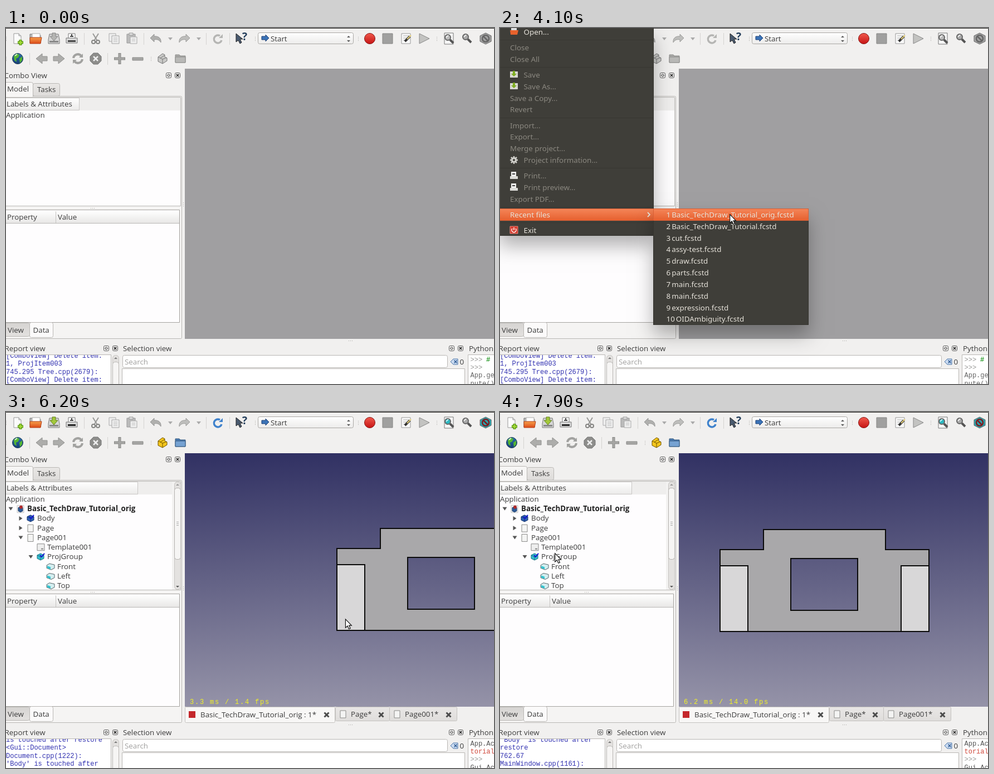
An HTML page with a canvas that plays this animation: 876 px wide and 639 px high, repeating every 8 s.

```html
<!DOCTYPE html>
<html lang="en">
<head>
<meta charset="utf-8">
<title>Opening a recent file</title>
<style>
html, body { margin: 0; width: 100%; height: 100%; overflow: hidden; background: #f1f0ef; }
canvas { display: block; }
</style>
</head>
<body>
<canvas id="stage" width="876" height="639"></canvas>
<script>
const c = document.getElementById('stage').getContext('2d');
const LOOP = 8000, STEP = 100;
const UI = '13.33px "Open Sans", sans-serif', BOLD = 'bold ' + UI;
const MENU_FONT = '13.4px "Noto Sans", sans-serif';
const MONO = '12px "Liberation Mono", monospace';
const INK = '#3b3b3b', EDGE = '#b9b7b4', BLUE = '#3030b0', RED = '#d0483b', GRAY = '#989896';

// ---- drawing helpers ----
function box(x, y, w, h, fill, stroke, r = 0) {
  c.beginPath();
  c.roundRect(x + .5, y + .5, w - 1, h - 1, r);
  if (fill) { c.fillStyle = fill; r || stroke ? c.fill() : c.fillRect(x, y, w, h); }
  if (stroke) { c.strokeStyle = stroke; c.lineWidth = 1; c.stroke(); }
}
function shade(y0, y1, from, to) {
  const g = c.createLinearGradient(0, y0, 0, y1);
  g.addColorStop(0, from);
  g.addColorStop(1, to);
  return g;
}
function text(s, x, y, color = INK, font = UI) {
  c.font = font;
  c.fillStyle = color;
  c.fillText(s, x, Math.round(y + 4.5));
}
// Each part is [path, fill, stroke, line width], relative to (x, y).
function icon(x, y, ...parts) {
  c.save();
  c.translate(x, y);
  for (const [d, fill, stroke, width = 1] of parts) {
    const path = new Path2D(d);
    if (fill) { c.fillStyle = fill; c.fill(path, 'evenodd'); }
    if (stroke) { c.strokeStyle = stroke; c.lineWidth = width; c.stroke(path); }
  }
  c.restore();
}
const disc = (r, x = 0, y = 0) => `M${x - r} ${y}a${r} ${r} 0 1 0 ${2 * r} 0a${r} ${r} 0 1 0 ${-2 * r} 0Z`;
const rect = (x, y, w, h) => `M${x} ${y}h${w}v${h}h${-w}Z`;
function clipped(x, y, w, h, draw) {
  c.save();
  c.beginPath();
  c.rect(x, y, w, h);
  c.clip();
  draw();
  c.restore();
}
function dots(x, y, dx, dy) {
  for (let i = -1; i <= 1; i++) box(x + i * dx, y + i * dy, 1, 1, '#a5a3a0');
}
function cross(x, y, r, color, width) {
  icon(x, y, [`M${-r} ${-r}L${r} ${r}M${r} ${-r}L${-r} ${r}`, null, color, width]);
}
function dockButtons(x, y) {
  box(x - 5, y - 5, 10, 10, '#f8f7f6', '#555', 2);
  icon(x, y, [disc(2), null, '#444', 1.2]);
  box(x + 11, y - 5, 10, 10, '#f8f7f6', '#555', 2);
  cross(x + 16, y, 2.4, '#333', 1.6);
}

// ---- toolbars ----
const PAGE = 'M-6-9H3L7-5V9H-6Z';
const TURN = 'M-10-1L-3-8V-4C5-5 10 0 9 7C6 2 2 1-3 2V6Z';
const ARROW = 'M-10 0L1-9V-4H10V4H1V9Z';
const CYCLE = 'M7 2A7 7 0 1 1 4-6';
const FOLDER = 'M-9-7H-2L0-5H9V7H-9Z';
const flip = (x, y, d, ...style) => {
  c.save();
  c.translate(x, y);
  c.scale(-1, 1);
  icon(0, 0, [d, ...style]);
  c.restore();
};
function cycle(x, y, color) {
  icon(x, y, [CYCLE, null, color, 3.5], ['M2-2H9V-9Z', color]);
}
function lens(x, y, color, page) {
  if (page) icon(x, y, [rect(-8, -10, 16, 20), '#f6f6f6', '#777']);
  icon(x, y, ['M2 2L8 8', null, '#555', 4], [disc(5, -2, -2), color, '#666', 2], ['M-5-2L-1-6', null, '#fff', 1.5]);
}
function toolbars(doc, zoomReady) {
  const live = (on, off) => doc ? on : off;
  for (const x of [140, 247, 359, 401]) box(x, 9, 1, 21, '#d5d3d1');
  for (const x of [42, 182]) box(x, 45, 1, 21, '#d5d3d1');
  for (const [x, y] of [[447, 19], [632, 19], [773, 19], [260, 55], [0, 19], [0, 55]]) dots(x, y, 0, 3);

  icon(20, 19, [PAGE, '#fbfbfb', '#999'], ['M3-9V-5H7', '#ddd', '#999']);
  icon(26, 26, ['M-5 0H5M0-5V5', null, '#5d9a17', 5], ['M-4 0H4M0-4V4', null, '#a5dd38', 2]);
  icon(53, 19, ['M-10-8H-4L-2-6H9V8H-10Z', '#bbb', '#777'], [rect(-6, -9, 14, 8), '#fff', '#aaa'],
    ['M-10-2H11L9 9H-10Z', shade(-2, 9, '#f6a04b', '#dc4a18'), '#b23c16']);
  icon(86, 19, ['M-10 2L-8-8H8L10 2V9H-10Z', '#d6d6d6', '#777'], [rect(-8, 4, 16, 3), '#888'],
    ['M-3-10H3V-4H7L0 4-7-4H-3Z', live('#a3c93a', '#b5b5b3'), live('#5f7f1a', '#858585')]);
  icon(118, 19, [rect(-6, -9, 12, 9), '#fff', '#777'], ['M-3-4H3M0-8V-3', null, '#444', 2],
    [rect(-10, -1, 20, 9), '#d9d9d9', '#777'], [rect(-7, 3, 14, 3), live('#222', '#444')]);
  icon(161, 19, ['M-5-9L3 4M5-9L-3 4', null, '#9a9a98', 2], [disc(3, -4, 6) + disc(3, 4, 6), null, '#858583', 2]);
  icon(194, 19, [rect(-9, -9, 12, 14), '#eee', '#aaa'], [rect(-4, -5, 13, 14), '#eee', '#a5a5a5'],
    ['M-1-1H6M-1 2H6M-1 5H6', null, '#bbb']);
  icon(226, 19, [rect(-9, -8, 15, 16), '#bbb', '#999'], [rect(-5, -10, 7, 4), '#ddd', '#999'],
    [rect(-3, -3, 12, 12), '#eee', '#aaa'], ['M0 1H6M0 4H6', null, '#bbb']);
  icon(269, 19, [TURN, '#b0b0ae', '#999']);
  flip(320, 19, TURN, '#bebebc', '#9d9d9b');
  for (const x of [295, 346]) icon(x, 19, ['M-4-2H4L0 3Z', '#aaa']);
  cycle(380, 20, live('#3f82cc', '#b5b5b3'));
  icon(420, 18, ['M-7-8V7L-3 4 0 10 3 8 0 2H5Z', '#4a5b70', '#222']);
  text('?', 424, 17, '#253f5c', 'bold 19px "Open Sans", sans-serif');

  box(452, 8, 172, 21, shade(8, 29, '#fff', '#ecebea'), '#aaa8a5', 3);
  icon(465, 18, ['M-6-3H1V-6L7 0 1 6V3H-6Z', '#3c74b8', '#1d3f74']);
  text('Start', 475, 19);
  icon(615, 19, ['M-3-2H3L0-5ZM-3 3H3L0 6Z', '#555']);

  icon(653, 19, [disc(9.5), shade(-9, 9, '#f0584b', '#c71616'), '#861616']);
  icon(685, 19, [rect(-9, -9, 18, 18), '#a0a09f', '#858584']);
  icon(719, 19, [rect(-9, -9, 16, 18), '#fafafa', '#999'], ['M-6-5H4M-6-1H4M-6 3H2', null, '#aaa'],
    ['M-3 5L6-4', null, '#333', 4], ['M1 1L8-6', null, '#e9d27a', 2]);
  icon(751, 19, ['M-9-9L9 0-9 9Z', '#c3c3c1', '#888']);
  lens(795, 19, live('#2cb9c2', '#bbb'), true);
  lens(827, 18, zoomReady ? '#23a9b0' : '#aaa');
  icon(861, 19, ['M-10-5L0-10 10-5V5L0 10-10 5Z', live('#29a5ad', '#a2a2a2'), '#666'],
    [disc(6), null, live('#7d1d22', '#666'), 2.5], ['M-4-4L4 4', null, live('#7d1d22', '#666'), 2.5]);

  icon(21, 55, [disc(9.5), shade(-9, 9, '#2c6fa9', '#173f78'), '#1c3b55'],
    ['M-7-5L-2-9 3-7 1-2-3 0-2 6-6 3ZM3 0L8-4 8 3 4 8Z', '#55b632'], ['M-5-5L-1-8', null, '#d9f2cf', 2]);
  icon(64, 55, [ARROW, '#adadab', '#91918f']);
  flip(95, 55, ARROW, '#adadab', '#91918f');
  icon(129, 55, ['M-8-1A8 8 0 0 1 6-5M8 1A8 8 0 0 1-6 5', null, '#a2a2a0', 4], ['M2-2H9V-9ZM-2 2H-9V9Z', '#a2a2a0']);
  icon(161, 55, ['M-4-10H4L10-4V4L4 10H-4L-10 4V-4Z', '#8d8d8b', '#777']);
  cross(161, 55, 4, '#eee', 2.5);
  icon(204, 55, ['M-10 0H10M0-10V10', null, '#888886', 5], ['M-9 0H9M0-9V9', null, '#a7a7a5', 3]);
  icon(236, 55, [rect(-9, -2, 19, 5), '#a7a7a5', '#888886']);
  const yellow = live('#f4c61c', '#c9c9c7'), brown = live('#6e5200', '#777');
  icon(281, 55, ['M-8-3L0-9 4-7V-3L8-1V4L0 9-8 5Z', yellow, brown], ['M-8-3L0 1V9M0 1L8-2M-4-1L4-6', null, brown]);
  icon(313, 55, [FOLDER, live('#4a7ab0', '#a9a9a7'), live('#34587f', '#8c8c8a')],
    [rect(-9, -3, 18, 10), live('#76a2d2', '#b9b9b7'), live('#34587f', '#8c8c8a')]);
}

// ---- side panel; rows are [depth, twisty, label, icon] ----
const DOC = [0, 'd', 'Basic_TechDraw_Tutorial_orig', 'doc'];
const TREES = [
  [],
  [DOC, [1, 'r', 'Body'], [1, 'r', 'Page'], [1, '', 'Dimension'], [1, '', 'Dimension001'], [1, 'r', 'Page001'], [1, '', 'Dimension002']],
  [DOC, [1, 'r', 'Body'], [1, 'r', 'Page'], [1, '', 'Dimension'], [1, '', 'Dimension001'], [1, 'd', 'Page001'],
    [2, '', 'Template001'], [2, 'd', 'ProjGroup'], [3, '', 'Front']],
  [DOC, [1, 'r', 'Body', 'body'], [1, 'r', 'Page', 'page'], [1, 'd', 'Page001', 'page'], [2, '', 'Template001', 'template'],
    [2, 'd', 'ProjGroup', 'group'], [3, '', 'Front', 'view'], [3, '', 'Left', 'view'], [3, '', 'Top', 'view']],
];
const cube = (fill, line) => [['M-6-3L0-6 6-3V3L0 6-6 3Z', fill, line], ['M-6-3L0 0 6-3M0 0V6', null, line]];
const TREE_ICONS = {
  doc: [[rect(-6, -6, 12, 13), '#f2f2f2', '#c5c5c5'], ['M-4-2L0-4 4-2V4L0 6-4 4Z', '#2c5a97', '#1d3d6b'], [disc(3, 1, -3), '#b02a2a']],
  body: [...cube('#2d5fb4', '#14336b'), ['M-2-3L1 0 6-6', null, '#1414d0', 2]],
  page: [[rect(-5, -6, 10, 13), '#f4f4f3', '#8a8a88']],
  template: [[rect(-6, -6, 13, 12), '#eee', '#888'], ['M1 3H5', null, '#888', 2]],
  group: [...cube('#35bfd0', '#1a7080'), ['M-1-3L2 0 7-6', null, '#1414d0', 2]],
  view: [['M-7-2L-2-5 7-3V3L1 6-7 3Z', '#d4eef0', '#56676a'], ['M-6-1L0 1V5L-6 3Z', '#35c3cf']],
};
function tree(state) {
  text('Application', 0, 156.5);
  TREES[state].forEach(([depth, twisty, label, kind], i) => {
    const y = 173.7 + i * 17.25, x = 18 + depth * 18;
    if (twisty) icon(x - 9.5, y, [twisty === 'd' ? 'M-4-3H4L0 3Z' : 'M-3-4L3 0-3 4Z', '#555']);
    if (kind) icon(x + 8, y, ...TREE_ICONS[kind]);
    text(label, x + (kind ? 20 : 0), y, depth ? INK : '#222', depth ? UI : BOLD);
  });
}
function sidePanel(state) {
  text('Combo View', -3.5, 85);
  dockButtons(292, 85);
  box(-5, 122, 321, 436, '#f5f4f3', EDGE, 2);
  box(48, 99, 49, 24, shade(99, 123, '#e9e7e5', '#dddbd9'), EDGE, 3);
  box(-5, 97, 54, 28, '#f7f6f5', EDGE, 3);
  box(-4, 123, 52, 3, '#f5f4f3');
  text('Model', 2, 109.5);
  text('Tasks', 56, 110.5);

  box(-5, 124, 319, 196, '#fefdfe', EDGE);
  box(0, 125, 313, 23, '#efeeed');
  const head = state ? 237 : 132;
  box(-2, 125, head + 2, 23, shade(125, 148, '#fff', '#ebeae9'), '#c9c7c5');
  text('Labels & Attributes', 1, 136.5);
  clipped(0, 148, 312, 171, () => tree(state));
  if (state > 1) {
    const end = state > 2 ? 265 : 247;
    box(298, 125, 15, 194, '#f3f2f1');
    box(302, 125, 12, 194, '#e4e2e0', '#c6c4c1', 5);
    box(302, 136, 12, end - 136, '#f6f5f4', '#b3b1ae', 4);
    icon(308, 131, ['M-3 1H3L0-2Z', '#999']);
    icon(308, 313, ['M-3-1H3L0 2Z', '#555']);
    const mid = (136 + end) >> 1;
    for (let i = -1; i < 2; i++) box(306, mid + i * 3, 4, 1, '#aaa');
  }
  dots(155, 323, 3, 0);
  dots(318, 316, 0, 3);

  box(-5, 326, 317, 203, '#fefdfe', '#a5a3a0');
  box(0, 328, 311, 23, shade(328, 351, '#fff', '#e7e6e5'));
  box(0, 350, 311, 1, '#b9b7b5');
  box(89, 329, 1, 21, '#c5c3c1');
  text('Property', 2, 339.5);
  text('Value', 93, 339.5);
  box(-5, 529, 48, 25, shade(529, 554, '#d6d4d2', '#e3e1df'), EDGE, 3);
  box(42, 528, 43, 28, '#fbfafa', EDGE, 3);
  text('View', 3, 542);
  text('Data', 48.5, 542.5);
}

// ---- bottom docks ----
const REPORTS = {
  idle: [['[ComboView] Delete item:'], ['1, ProjItem003'], ['745.295 Tree.cpp(2679):'], ['[ComboView] Delete item:']],
  loading: [['761.561 Tree.cpp(2679):'], ['[ComboView] Delete item:'], ['68, Sketch004'], ['<PropShape>', '#f0b429']],
  touched: [['is touched after restore'], ['<Gui::Document>'], ['Document.cpp(1222):'], ["'Body' is touched after"]],
  fitted: [["'Body' is touched after"], ['restore'], ['762.67'], ['MainWindow.cpp(1161):']],
};
const CONSOLES = [
  [['>>>'], ['>>>'], ['App.ge', '#666'], ['pute()', '#666']],
  [['asic_T', RED], ['>>>'], ['App.se', '#555'], ['>>>']],
  [['App.Ac', '#555'], ['torial', RED], ['>>>'], ['Gui.Ac', '#555']],
];
function docks(state, report) {
  dots(618, 561, 3, 0);
  text('Report view', -2.5, 575.5);
  dockButtons(180, 575);
  text('Selection view', 210, 575.5);
  dockButtons(800, 575);
  text('Python console', 831, 575.5);

  box(-5, 586, 194, 60, '#fff', EDGE);
  clipped(0, 587, 188, 52, () =>
    REPORTS[report].forEach(([s, color = BLUE], i) => text(s, 0, 587.2 + i * 14.5, color, MONO)));
  box(191, 587, 12, 60, '#e4e2e0', '#c6c4c1', 5);
  box(191, 599, 12, 60, '#f6f5f4', EDGE, 4);
  icon(197, 593, ['M-3 1H3L0-2Z', '#777']);

  box(209, 587, 584, 23, '#fff', EDGE, 3);
  text('Search', 213, 599, '#a09f9e');
  icon(805, 599, ['M-7 0L-2-5H6V5H-2Z', '#c9daf0', '#4a74a8']);
  cross(807, 599, 2.5, '#2f5c94', 1.5);
  text('0', 814.5, 599);
  box(208, 611, 616, 40, '#fff', EDGE);

  box(829, 586, 60, 60, '#fff', EDGE);
  const lines = CONSOLES[Math.max(0, state - (state > 1 ? 1 : 0))];
  lines.forEach(([s, color = GRAY], i) => text(s, 833.5, 594 + i * 14.4, color, MONO));
  if (!state) text('#', 862, 594, '#2a9a2a', 'bold ' + MONO);
}

// ---- 3D view ----
function part(dx, dy) {
  const outline = 'M395 394V247H473V211H692V247H770V394Z', hole = rect(522, 263, 120, 93);
  icon(dx, dy, [outline + hole, '#a9a8aa', '#0b0b0b', 2],
    [rect(395, 276, 50, 118) + rect(720, 276, 50, 118), '#d8d7d8', '#0b0b0b', 2]);
}
function viewTab(x, w, label, active, kind) {
  box(x, 529, w, active ? 29 : 26, active ? '#f8f7f6' : shade(529, 555, '#e9e7e6', '#dfdddb'), '#c4c2bf', 2);
  const y = active ? 543.5 : 542.5;
  if (kind === 'page') icon(x + 14, 542, ...TREE_ICONS.page);
  else box(x + 7, 537, 12, 12, '#c4272b');
  text(label, x + 28, y);
  cross(x + w - 15.5, 543.5, 4, '#4b4b4b', 3);
}
function view(state, fitted) {
  if (!state) return box(321, 73, 555, 485, '#a09fa1');
  box(321, 74, 555, 455, shade(74, 529, '#313163', '#9593a8'));
  clipped(321, 74, 555, 455, () => {
    if (state > 1) fitted ? part(0, 0) : part(199, -2);
    c.letterSpacing = '1.8px';
    text(fitted ? '6.2 ms / 14.0 fps' : ['', '6.0 ms / 107.2 fps', '3.9 ms / 4.0 fps', '3.3 ms / 1.4 fps'][state],
      330, 519.5, '#f2f224', MONO);
    c.letterSpacing = '0px';
  });
  const edited = state !== 2;
  viewTab(321, edited ? 270 : 262, 'Basic_TechDraw_Tutorial_orig : 1' + (edited ? '*' : ''), true);
  if (state > 2) {
    viewTab(591, 98, 'Page*', false, 'page');
    viewTab(688, 122, 'Page001*', false, 'page');
  }
}

// ---- menus; entries are [label, y, indented, enabled] ----
const MENU = [
  ['Open...', 7, 1, 1], ['Close', 35], ['Close All', 56], ['Save', 84, 1], ['Save As...', 105, 1],
  ['Save a Copy...', 126], ['Revert', 146.5], ['Import...', 175], ['Export...', 195.5], ['Merge project...', 216.5],
  ['Project information...', 237.5, 1], ['Print...', 265.5, 1], ['Print preview...', 286.5, 1],
  ['Export PDF...', 307.5], ['Recent files', 335, 0, 1], ['Exit', 363, 1, 1],
];
const RECENT = ['Basic_TechDraw_Tutorial_orig', 'Basic_TechDraw_Tutorial', 'cut', 'assy-test', 'draw', 'parts',
  'main', 'main', 'expression', 'OIDAmbiguity'];
function menuPanel(x, y, w, h) {
  c.save();
  c.shadowColor = 'rgba(0,0,0,.3)';
  c.shadowBlur = 32;
  c.shadowOffsetY = 18;
  box(x, y, w, h, '#3f3e39');
  c.restore();
  box(x, y, w, h, null, '#35342f');
}
const highlight = (x, w) => box(x, 324, w, 22, shade(324, 346, '#f58659', '#e65f2e'), '#d95f35');
function menu(hover, open, picked) {
  menuPanel(-2, -2, 278, 375);
  for (const y of [21, 70, 161, 251, 321, 349]) box(0, y, 275, 1, '#383732');
  if (hover) highlight(-1, 277);
  for (const [s, y, indented, on] of MENU) text(s, indented ? 42.5 : 18, y, on ? '#e6e2da' : '#8b8880', MENU_FONT);
  icon(25, 6, [rect(-5, -9, 10, 9), '#ddd'], ['M-7-2H8L6 6H-6Z', '#e8622c']);
  for (const y of [83, 104]) icon(25, y, [rect(-7, -5, 14, 11), '#d8d8d2'], ['M-2-6H2V-1H5L0 4-5-1H-2Z', '#7fae22']);
  icon(25, 237, [disc(5) + disc(2), '#d0cfca'], ['M0-7V-4M0 4V7M-7 0H-4M4 0H7M-5-5L-3-3M3 3L5 5M5-5L3-3M-3 3L-5 5', null, '#d0cfca', 2.5]);
  for (const y of [265, 286]) icon(25, y, [rect(-5, -7, 9, 8), '#f0f0ee'], [rect(-7, 1, 14, 5), '#dcdcd8'], ['M-3-3H2', null, '#444', 2]);
  icon(25, 362, [rect(-7, -6, 14, 13), '#d63a2c', '#e8887e'], ['M-3-2A4 4 0 1 0 3-2M0-4V1', null, '#fff', 1.5]);
  icon(267, 335, ['M-2-4L2 0-2 4', null, '#e6e2da', 1.8]);
  if (!open) return;
  menuPanel(275, 324, 279, 209);
  if (picked) highlight(275, 279);
  c.wordSpacing = '-1.5px';
  RECENT.forEach((name, i) => text(`${i + 1} ${name}.fcstd`, 298.5, 335.3 + i * 20.85, '#e6e2da', MENU_FONT));
  c.wordSpacing = '0px';
}

// ---- pointer: [time, x, y]; a key without a place hides it ----
const PATH = [
  [0], [500, 343, 129], [900, 42, 5], [1000], [1500, 315, 3], [1600], [2000, 784, 62], [2100],
  [2900, 50, 12], [3400, 131, 335], [3600, 131, 335], [3900, 463, 343], [4000, 463, 343], [4100, 412, 334], [4300, 412, 334],
  [4400, 407, 337], [4800, 407, 337], [5700, 535, 344], [6100, 648, 316], [6500, 491, 537], [6900, 491, 537],
  [7300, 793, 17], [7400, 793, 17], [7500, 793, 210], [7900, 98, 253], [LOOP, 98, 253],
];
function pointer(t) {
  const i = PATH.findLastIndex(key => key[0] <= t);
  const [t0, x0, y0] = PATH[i], [t1, x1 = x0, y1 = y0] = PATH[i + 1];
  if (x0 === undefined) return;
  const k = PATH[i + 1].length > 1 ? (t - t0) / (t1 - t0) : 0;
  const x = x0 + (x1 - x0) * k, y = y0 + (y1 - y0) * k;
  if (t < 4400 || t >= 6100) {
    icon(x, y, ['M.7.7V16L4.3 12.8 6.8 18.3 9.4 17.2 7 11.8H11.5Z', '#fff', '#111', 1.2]);
    return;
  }
  icon(x, y, [disc(7.7), '#fff', '#222', 1.6]);
  for (let n = 0; n < 5; n++) {
    const a = t / 160 + n * .6;
    icon(x + 4 * Math.cos(a), y + 4 * Math.sin(a), [disc(.9), `rgba(30,30,30,${.2 + n * .18})`]);
  }
}

function draw(now) {
  const t = Math.floor(now % LOOP / STEP) * STEP;
  const state = [4500, 5300, 5900].filter(start => t >= start).length;
  const fitted = t >= 7400;
  box(0, 0, 876, 639, '#f1f0ef');
  box(0, 0, 876, 1, '#2b2a28');
  toolbars(state > 0, state === 1 || state === 2);
  view(state, fitted);
  sidePanel(state);
  docks(state, fitted ? 'fitted' : state > 2 ? 'touched' : state ? 'loading' : 'idle');
  if (t >= 2800 && t < 4300) menu(t >= 3400, t >= 3500, t >= 3800);
  pointer(t);
  requestAnimationFrame(draw);
}
requestAnimationFrame(draw);
</script>
</body>
</html>
```
